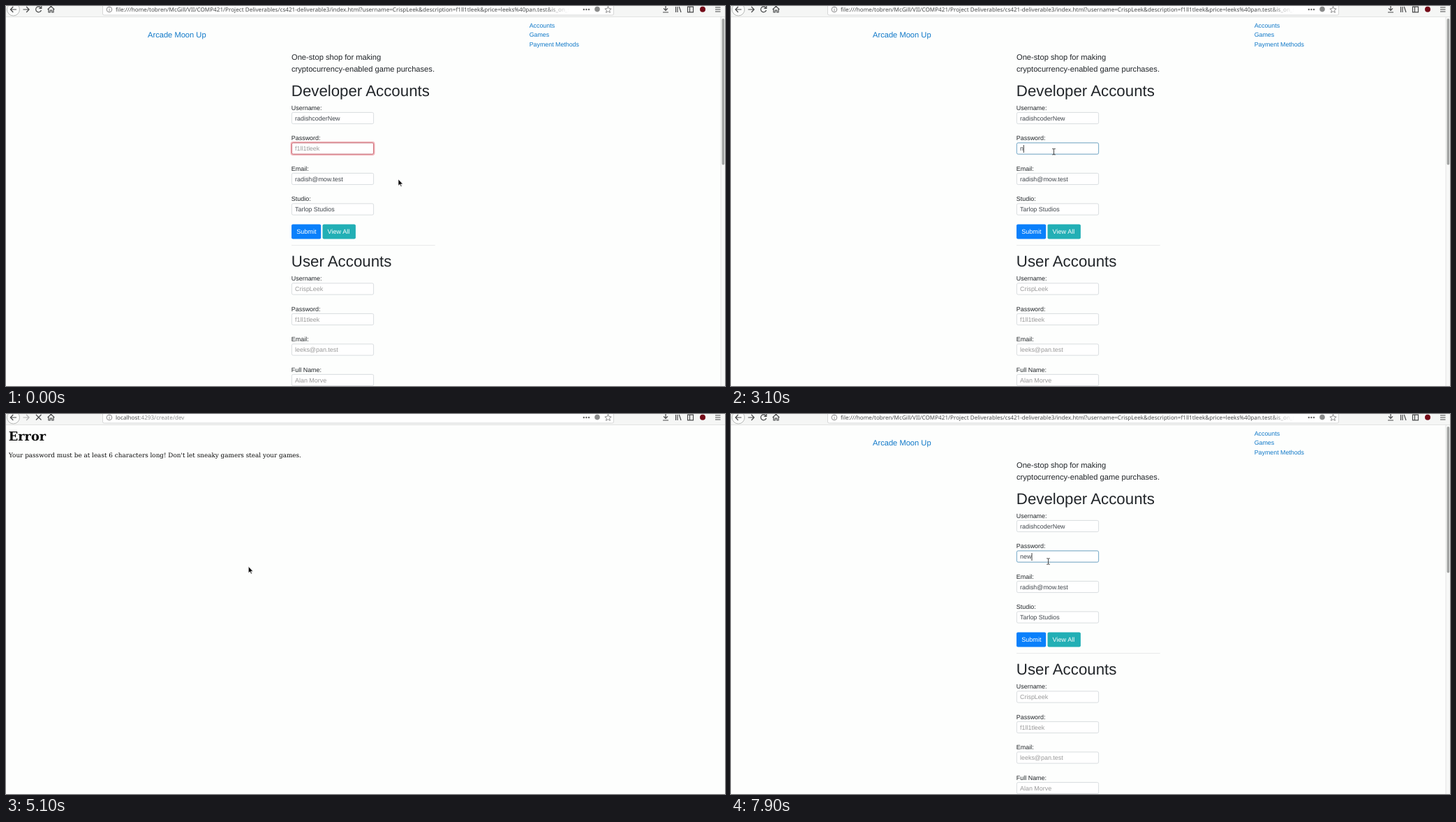
Recreate the animation shown at these times as an HTML page. Size 1030 by 544 pixels, loop 8000 ms.

```html
<!DOCTYPE html>
<html lang="en">
<head>
<meta charset="utf-8">
<title>Form validation</title>
<style>
  html, body { margin: 0; width: 100%; height: 100%; overflow: hidden; background: #fdfefd; }
  svg { display: block; }
  #stage { width: 1030px; height: 544px; }
  text { font: 8.95px "Liberation Sans", Arial, sans-serif; fill: #212529; white-space: pre; text-rendering: geometricPrecision; }
  .lead { font-size: 11.15px; }
  .h1 { font-size: 22.27px; }
  .link { fill: #0f78c8; }
  .nav { font-size: 8.85px; }
  .value { fill: #40464c; }
  .hint { fill: #999; }
  .white { fill: #fff; font-size: 9.1px; }
  .box { fill: #fff; stroke: #d0d5d9; stroke-width: .8; }
  .ui { font: 8.15px "Noto Sans", sans-serif; fill: #484a4b; }
  .serif { font: 8.86px "DejaVu Serif", serif; fill: #080808; }
  .icon { fill: none; stroke: #48494a; stroke-width: 1.2; }
  .thin { fill: none; stroke: #6c6d6e; stroke-width: .8; }
</style>
</head>
<body>
<svg id="stage" viewBox="0 0 1030 544">
  <defs>
    <linearGradient id="fade">
      <stop offset="0" stop-color="#fff" stop-opacity="0"/>
      <stop offset="1" stop-color="#fff"/>
    </linearGradient>
  </defs>

  <g id="toolbar">
    <rect width="1030" height="15.5" fill="#f5f6f5"/>
    <path d="M0 15.5H1030" stroke="#dcdddc" stroke-width=".8"/>
    <circle cx="10.5" cy="5" r="9" fill="#fbfcfb" stroke="#a5a7a6" stroke-width=".8"/>
    <path class="icon" d="M15 5H6.5M10.3 1 6.4 5l3.9 4"/>
    <path class="icon" id="forward" d="M24.5 5H33M29.2 1 33.1 5l-3.9 4"/>
    <path class="icon" id="reload" d="M50 2.6A4 4 0 1 0 50.5 6M50.8 0V3.3H47.3"/>
    <path class="icon" id="slash" d="M43.5 2 48.5 7"/>
    <path class="icon" id="stop" d="M43 1 50.5 8.5M50.5 1 43 8.5"/>
    <path class="icon" d="M59.7 5 64.5.4 69.3 5M61 4.5V9H63.3V6H65.7V9H68V4.5"/>
    <rect x="138.5" y="-6" width="732" height="19" rx="2" fill="#fff" stroke="#cdcfce" stroke-width=".8"/>
    <circle class="thin" cx="148" cy="5" r="3.8"/>
    <path class="thin" d="M148 4.3V7.3M148 2.5V3.4"/>
    <path class="thin" d="M862.5.5 863.8 3.7 867.1 4 864.6 6.2 865.4 9.4 862.5 7.7 859.6 9.4 860.4 6.2 857.9 4 861.2 3.7Z"/>
    <g fill="#666">
      <circle cx="827.8" cy="5" r="1.2"/><circle cx="831.4" cy="5" r="1.2"/><circle cx="835" cy="5" r="1.2"/>
      <circle cx="847" cy="4.6" r="3.8" fill="#8a8b8b"/>
    </g>
    <path class="icon" d="M945 0V6M942 3.3 945 6.3 948 3.3M941 9H949"/>
    <path class="icon" d="M959.5 1V9M962 1V9M964.3 1 967 9"/>
    <path class="icon" d="M976.5 1.2H984.5V8.8H976.5ZM979.5 1V9"/>
    <circle cx="998" cy="4.8" r="4" fill="#740b18"/>
    <path class="icon" d="M1016 2H1023.5M1016 5H1023.5M1016 8H1023.5"/>
    <svg x="157" width="650" height="13">
      <text class="ui" y="8" id="fileUrl">file:///home/tobren/McGill/VII/COMP421/Project Deliverables/cs421-deliverable3/index.html?username=CrispLeek&amp;description=f1ll1tleek&amp;price=leeks%40pan.test&amp;is_on_sale=on</text>
      <text class="ui" y="8" id="hostUrl">localhost<tspan fill="#8b8d8e">:4293/create/dev</tspan></text>
      <rect x="613" width="37" height="12" fill="url(#fade)"/>
    </svg>
  </g>

  <g id="formPage">
    <text class="lead link" x="203" y="45">Arcade Moon Up</text>
    <text class="nav link" x="749.7" y="31">Accounts</text>
    <text class="nav link" x="749.7" y="44.3">Games</text>
    <text class="nav link" x="749.7" y="57.6">Payment Methods</text>
    <text class="lead" x="409" y="77.4">One-stop shop for making</text>
    <text class="lead" x="409" y="94">cryptocurrency-enabled game purchases.</text>
    <text class="h1" x="408.8" y="128.8">Developer Accounts</text>
    <text class="h1" x="408.8" y="373.3">User Accounts</text>
    <g id="fields"></g>
    <rect id="redGlow" x="408.3" y="194.8" width="119.4" height="18.4" rx="2.6" fill="none" stroke="#e0404f" stroke-width="1.5" stroke-opacity=".38"/>
    <rect id="focusRing" x="409.4" y="195.9" width="117.2" height="16.2" rx="2" fill="none" stroke-width=".9"/>
    <path id="caret" stroke="#111" stroke-width=".8"/>
    <rect id="submitRing" x="408.2" y="311.6" width="44" height="22.8" rx="3" fill="none" stroke="#86bdf6" stroke-width="2"/>
    <rect id="submit" x="409" y="312.4" width="42.2" height="21.2" rx="2"/>
    <rect x="453.5" y="312.4" width="47.4" height="21.2" rx="2" fill="#22afb5"/>
    <text class="white" x="416.2" y="326.2">Submit</text>
    <text class="white" x="460.6" y="326.2">View All</text>
    <path d="M409 342.6H614.6" stroke="#e3e4e4" stroke-width=".8"/>
    <rect x="1024" y="16" width="6" height="528" fill="#f7f8f7"/>
    <path d="M1024 16V544" stroke="#dedfde" stroke-width=".8"/>
    <rect x="1025.6" y="18" width="3.6" height="209.5" rx="1.8" fill="#a2a4a3"/>
    <g id="tooltip">
      <rect x="461" y="219" width="92" height="21" rx="2" fill="#1c1c1c" fill-opacity=".88"/>
      <text class="ui" x="466.5" y="232.2" style="font-size:7.5px;fill:#fff">Please fill out this field.</text>
    </g>
    <g id="status">
      <rect x="-1" y="533.6" width="180" height="12" rx="1" fill="#f3f4f3" stroke="#cfd0cf" stroke-width=".8"/>
      <text class="ui" x="1.8" y="542.6">Waiting for localhost…</text>
    </g>
  </g>

  <g id="errorPage">
    <text class="serif" x="3.8" y="38" style="font-size:17.7px;font-weight:bold">Error</text>
    <text class="serif message" x="4" y="62.3"></text>
    <svg id="selection" x="123.7" y="53.6" height="11.2">
      <rect width="200" height="12" fill="#4a90d9"/>
      <text class="serif message" x="-119.7" y="8.7" style="fill:#fff"></text>
    </svg>
  </g>

  <g id="cursor">
    <path id="arrow" d="M0 0V9.2L2.2 7.3 3.7 10.6 5.1 10 3.6 6.9H6.5Z" fill="#080808" stroke="#fff" stroke-width=".6"/>
    <path id="beam" d="M-2.3-4.2H-.6Q0-4.2 0-3.5Q0-4.2.6-4.2H2.3M0-3.5V3.5M-2.3 4.2H-.6Q0 4.2 0 3.5Q0 4.2.6 4.2H2.3" fill="none" stroke="#333" stroke-width=".9"/>
    <path id="hand" d="M-.8.6Q0-.6.8.6V3.6L4 4.3Q5 4.6 4.9 5.6L4.3 8.2V10H.2V8.8L-1.8 6.2Q-1.8 5.2-.8 5.6Z" fill="#0a0a0a" stroke="#fff" stroke-width=".5"/>
  </g>
</svg>
<script>
const $ = id => document.getElementById(id);
const show = (id, on) => { $(id).style.display = on ? '' : 'none'; };
const set = (id, attrs) => { for (const k in attrs) $(id).setAttribute(k, attrs[k]); };

const fields = [
  [160.5, 'Username:', 'radishcoderNew', 'value'],
  [204, 'Password:', '', 'value'],
  [247.5, 'Email:', 'radish@mow.test', 'value'],
  [291, 'Studio:', 'Tarlop Studios', 'value'],
  [405, 'Username:', 'CrispLeek', 'hint'],
  [448.5, 'Password:', 'f1ll1tleek', 'hint'],
  [492, 'Email:', 'leeks@pan.test', 'hint'],
  [535.5, 'Full Name:', 'Alan Morve', 'hint']
];
$('fields').innerHTML = fields.map(([y, label, text, kind]) => `
  <text x="408.8" y="${y - 11.9}">${label}</text>
  <rect class="box" x="409.4" y="${y - 8.1}" width="117.2" height="16.2" rx="2"/>
  <text class="${kind}" x="414" y="${y + 3.2}">${text}</text>`).join('');
const password = $('fields').querySelectorAll('text')[3];

document.querySelectorAll('.message').forEach(el => {
  el.textContent = "Your password must be at least 6 characters long! Don't let sneaky gamers steal your games.";
});

// time, x, y, pointer shape from that time on
const moves = [
  [0, 562, 248, 'arrow'], [500, 464, 304, 'arrow'], [600, 440, 318, 'hand'], [700, 430, 320, 'hand'],
  [1000, 428, 320, 'hand'], [1200, 406, 320, 'arrow'], [1300, 400, 320, 'arrow'], [1400, 400, 320, 'arrow'],
  [1500, 500, 290, 'arrow'], [1600, 518, 232, 'arrow'], [1700, 463.5, 208.6, 'beam'],
  [1800, 463.5, 208.6, 'beam'], [1900, 462.5, 208.6, 'beam'], [3700, 462.5, 208.6, 'beam'],
  [3900, 454, 240, 'beam'], [4000, 447, 272, 'arrow'], [4100, 436, 316, 'hand'], [4200, 429, 325, 'hand'],
  [4600, 429, 325, 'arrow'], [4900, 426, 287, 'arrow'], [5000, 426, 287, 'arrow'],
  [5300, 190, 81, 'arrow'], [5400, 190, 81, 'arrow'], [5600, 136, 62, 'beam'], [5700, 125.5, 59, 'beam'],
  [5900, 177, 59, 'beam'], [6100, 177, 59, 'beam'], [6200, 178, 55.5, 'arrow'],
  [6600, 25, 14, 'arrow'], [6700, 25, 14, 'arrow'], [6800, 5.5, 8, 'arrow'], [7000, 5.5, 8, 'arrow'],
  [7300, 452, 159.6, 'beam'], [7400, 452, 159.6, 'beam'], [7600, 454.8, 198.6, 'beam'],
  [7700, 454.8, 198.6, 'beam'], [7900, 454.5, 211, 'beam']
];

// last entry whose time has been reached
const at = (steps, t) => steps.filter(s => s[0] <= t).pop()[1];

function pointer(t) {
  const i = moves.findLastIndex(m => m[0] <= t);
  const [t0, x0, y0, shape] = moves[i];
  const [t1, x1, y1] = moves[i + 1] || [t0 + 1, x0, y0];
  const k = (t - t0) / (t1 - t0);
  return [x0 + (x1 - x0) * k, y0 + (y1 - y0) * k, shape];
}

const typed = [[0, ''], [3100, 'n'], [3200, 'new']];
const caretX = { '': 414.4, n: 419.3, new: 431 };
const ringColor = { invalid: '#cf5a66', both: '#77769f', focus: '#70a9cb' };
const fieldLook = [[0, 'invalid'], [1200, 'both'], [3100, 'focus'], [4200, 'plain'], [7800, 'focus']];
const caretOn = [[0, false], [1200, true], [2200, false], [3100, true], [3400, false], [7800, true]];
const submitLook = [[0, 'idle'], [600, 'hover'], [1000, 'ring'], [1200, 'idle'], [4100, 'hover'], [4200, 'ring'], [7800, 'idle']];
const loading = [[0, 'reload'], [4500, 'slash'], [4600, 'stop'], [5200, 'slash'], [5300, 'reload']];

function draw(t) {
  const error = t >= 4600 && t < 6900;
  show('formPage', !error);
  show('fileUrl', !error);
  show('errorPage', error);
  show('hostUrl', error);
  set('forward', { 'stroke-opacity': error ? .4 : 1 });
  for (const id of ['reload', 'slash', 'stop']) show(id, at(loading, t) === id);

  const text = at(typed, t), look = at(fieldLook, t), button = at(submitLook, t);
  password.textContent = text || 'f1ll1tleek';
  password.setAttribute('class', text ? 'value' : 'hint');
  show('redGlow', look === 'invalid' || look === 'both');
  set('focusRing', { stroke: ringColor[look] || 'none' });
  show('caret', at(caretOn, t));
  set('caret', { d: `M${caretX[text]} 199V210` });
  show('submitRing', button === 'ring');
  set('submit', { fill: button === 'idle' ? '#0a80fb' : '#066bd3' });
  show('tooltip', t >= 2500 && t < 3100);
  show('status', t >= 4500 && t < 4600);

  const [x, y, shape] = pointer(t);
  show('selection', t > 5700);
  set('selection', { width: Math.max(0, Math.min(1, (t - 5700) / 200)) * 53 });
  set('cursor', { transform: `translate(${x} ${y})` });
  for (const id of ['arrow', 'beam', 'hand']) show(id, id === shape);
}

const start = performance.now();
function tick() {
  const t = (performance.now() - start) % 8000;
  draw(Math.floor(t / 100) * 100);
  requestAnimationFrame(tick);
}
tick();
</script>
</body>
</html>
```
